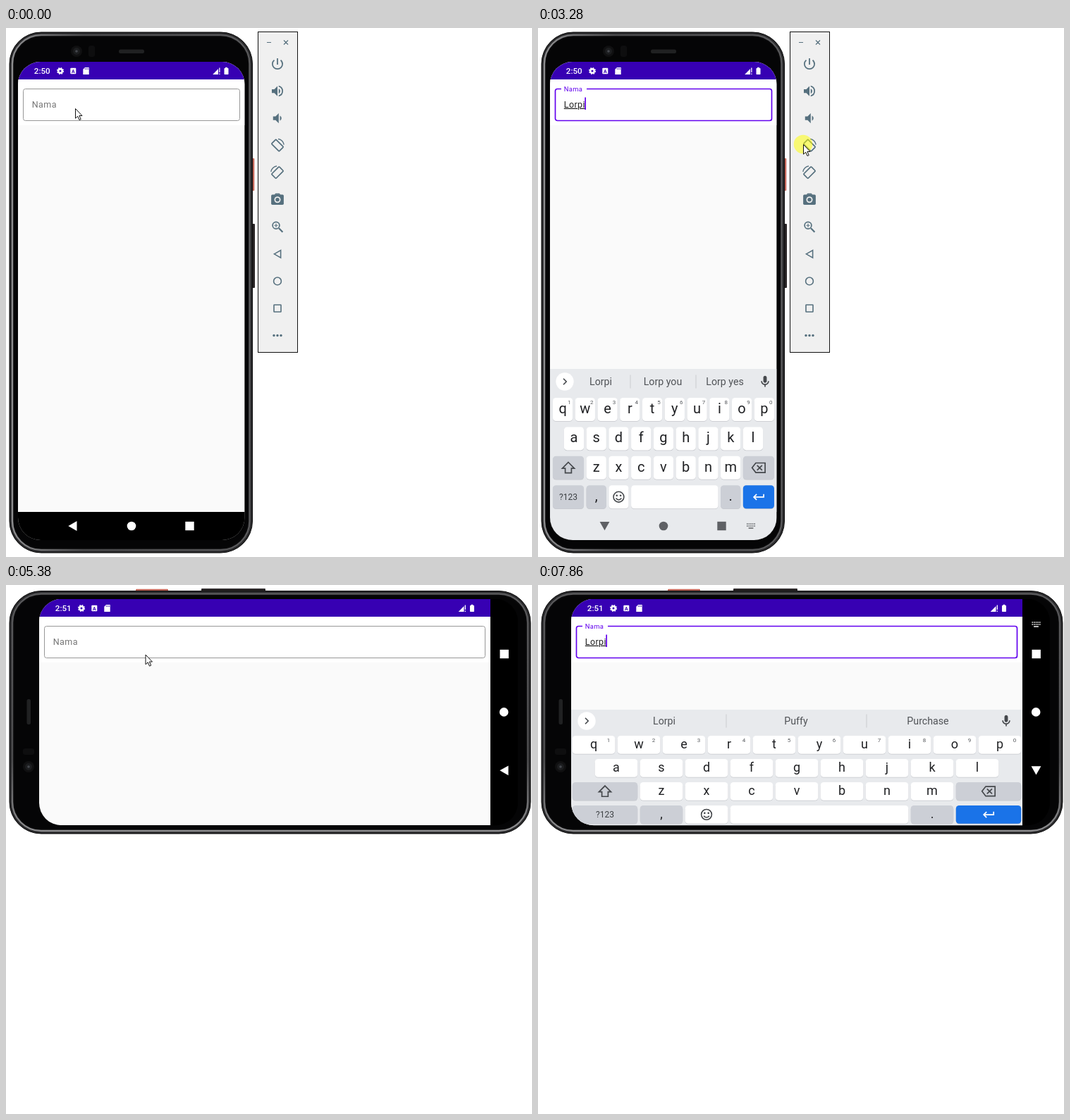
Animation, 746 px wide and 751 px high, one loop 8000 ms. Source, as an HTML page:

```html
<!DOCTYPE html>
<html lang="id">
<head>
<meta charset="utf-8">
<title>Form demo</title>
<style>
html, body { margin: 0; width: 100%; height: 100%; overflow: hidden; background: #fff; }
svg { display: block; width: 100vw; height: 100vh; }
text { font-family: Roboto, Arial, sans-serif; }
.mid { text-anchor: middle; }
.under { text-decoration: underline; text-decoration-thickness: 1px; }
</style>
</head>
<body>
<svg id="stage" viewBox="0 0 746 751"></svg>
<script>
const LOOP = 8000;
const WORD = 'Lorpi';
const PURPLE = '#6200ee';
const INK = '#3c4043';
const stage = document.getElementById('stage');

// ---------- drawing helpers ----------
const at = (x, y, s, more = '') => `<g transform="translate(${x} ${y})" ${more}>${s}</g>`;
const rect = (x, y, w, h, fill, r = 0, more = '') =>
  `<rect x="${x}" y="${y}" width="${w}" height="${h}" rx="${r}" fill="${fill}" ${more}/>`;
const disc = (x, y, r, fill = 'currentColor') => `<circle cx="${x}" cy="${y}" r="${r}" fill="${fill}"/>`;
const ring = (x, y, r, w) =>
  `<circle cx="${x}" cy="${y}" r="${r}" fill="none" stroke="currentColor" stroke-width="${w}"/>`;
const fill = (d, more = '') => `<path d="${d}" fill="currentColor" ${more}/>`;
const line = (d, w = 1.5, more = '') =>
  `<path d="${d}" fill="none" stroke="currentColor" stroke-width="${w}" ${more}/>`;
const text = (x, y, size, s, color = INK, more = '') =>
  `<text x="${x}" y="${y}" font-size="${size}" fill="${color}" ${more}>${s}</text>`;
const mid = (x, y, size, s, color = INK, more = '') => text(x, y, size, s, color, 'class="mid" ' + more);
const glyph = (d, k) => `<g transform="scale(${k}) translate(-12 -12)">${fill(d)}</g>`;

const gear = r => ring(0, 0, r * .55, r * .5) +
  `<circle r="${r * .85}" fill="none" stroke="currentColor" stroke-width="${r * .32}"
    stroke-dasharray="${r * .36} ${r * .3076}"/>`;

const icon = {
  mic: glyph('M12 14c1.66 0 3-1.34 3-3V5c0-1.66-1.34-3-3-3S9 3.34 9 5v6c0 1.66 1.34 3 3 3zm5-3c0 2.76-2.24 5-5 5s-5-2.24-5-5H5c0 3.53 2.61 6.43 6 6.92V21h2v-3.08c3.39-.49 6-3.39 6-6.92h-2z', .82),
  shift: line('M0-7.8L8.5 .8H4.4V7.4H-4.4V.8H-8.5Z', 1.7),
  erase: line('M-9.3 0L-4-6.8H9.2V6.8H-4ZM-2.2-3.5L5 3.5M5-3.5L-2.2 3.5', 1.7),
  enter: line('M7.2-4V.2H-6.6M-2.8-3.8L-6.8 .2L-2.8 4.2', 1.7),
  smile: ring(0, 0, 7.4, 1.6) + disc(-2.7, -2, 1.3) + disc(2.7, -2, 1.3) + line('M-4 1.8Q0 6.6 4 1.8', 1.5),
  sticker: line('M-6-6.2H6.2V2L2 6.2H-4.5Q-6.2 6.2-6.2 4.5V-4.5Q-6.2-6.2-4.5-6.2M2 6.2V2H6.2M-3 .8Q-1 3.5 1.5 2', 1.5) +
    disc(-2.3, -2, 1) + disc(2.3, -2, 1),
  clip: line('M-5.6-6H5.6V7H-5.6ZM-3-1.6H3M-3 1.2H3M-3 4H1', 1.5) + rect(-3, -8, 6, 3.6, 'currentColor', 1),
  palette: glyph('M12 3a9 9 0 0 0 0 18c.83 0 1.5-.67 1.5-1.5 0-.39-.15-.74-.39-1.01-.23-.26-.38-.61-.38-.99 0-.83.67-1.5 1.5-1.5H16c2.76 0 5-2.24 5-5 0-4.42-4.03-8-9-8z', .83) +
    [[-4.5, -.4], [-2, -3.8], [2.2, -3.8], [4.6, -.4]].map(p => disc(...p, 1.2, '#e8eaed')).join(''),
  dots: [-5, 0, 5].map(x => disc(x, 0, 1.7)).join(''),
  keys: line('M-6-3H6M-6 0H6', 1.6, 'stroke-dasharray="1.6 1"') + line('M-3.4 3H3.4', 1.6)
};

// ---------- emulator tool window ----------
function toolWindow() {
  const diamond = a => rect(-4.4, -7.6, 8.8, 15.2, 'none', 1,
    `stroke="currentColor" stroke-width="1.7" transform="rotate(${a})"`);
  const items = [
    glyph('M13 3h-2v10h2V3zm4.83 2.17l-1.42 1.42A6.92 6.92 0 0 1 19 12c0 3.87-3.13 7-7 7s-7-3.13-7-7c0-2.18 1-4.13 2.58-5.42L6.17 5.17A8.93 8.93 0 0 0 3 12a9 9 0 0 0 18 0c0-2.74-1.23-5.18-3.17-6.83z', .89),
    glyph('M3 9v6h4l5 5V4L7 9H3zm13.5 3A4.5 4.5 0 0 0 14 7.97v8.05A4.5 4.5 0 0 0 16.5 12zM14 3.23v2.06a7 7 0 0 1 0 13.42v2.06a9 9 0 0 0 0-17.54z', .89),
    glyph('M18.5 12A4.5 4.5 0 0 0 16 7.97v8.05A4.5 4.5 0 0 0 18.5 12zM5 9v6h4l5 5V4L9 9H5z', .89),
    diamond(-45) + line('M1-9.2A9.4 9.4 0 0 1 9.2-1', 1.4),
    diamond(45) + line('M-1-9.2A9.4 9.4 0 0 0-9.2-1', 1.4),
    rect(-8.9, -7.2, 17.8, 14.4, 'currentColor', 1.8) + fill('M-4.5-7L-2.7-9H2.7L4.5-7Z') +
      disc(0, 0, 4.5, '#f0f0f0') + disc(0, 0, 2.8),
    ring(-2, -2, 4.9, 1.7) + line('M2 2L7.4 7.4', 2.2) + line('M-4.6-2H.6M-2-4.6V.6', 1.1),
    line('M-4.6 0L4.6-5.3V5.3Z', 1.6),
    ring(0, 0, 5.4, 1.6),
    rect(-5, -5, 10, 10, 'none', .5, 'stroke="currentColor" stroke-width="1.6"'),
    icon.dots
  ];
  return rect(357.5, 5.5, 56, 455, '#f0f0f0', 0, 'stroke="#111"') +
    at(0, 0, line('M370 20.5H376M394 17.5L400 23.5M400 17.5L394 23.5', 1.2) +
      items.map((s, i) => at(385, 51 + i * 38.55, s)).join(''), 'color="#56707e"');
}

// ---------- phone body, upright ----------
const body =
  rect(346, 185, 6.3, 46, '#c4675a', 1) + rect(346, 278, 7, 91, '#2a2627', 1) +
  rect(5, 6, 344.5, 739, '#29292b', 45, 'stroke="#0a0a0a"') +
  rect(9, 10, 336.5, 731, '#09090a', 41, 'stroke="url(#rim)" stroke-width="2.4"') +
  rect(12, 13, 330.5, 725, '#050506', 38) +
  disc(100, 33, 8, '#101011') + disc(100, 33, 5, '#1c1d1f') + disc(100, 33, 1.8, '#45484d') +
  rect(117, 25, 9, 16, '#0e0e0f', 3) + rect(160, 30.5, 36, 5.5, '#202122', 2.5);

// ---------- keyboard ----------
function keyboard(o) {
  const key = (from, span, row, face, label, sup) => {
    const x = o.x0 + from * o.pitch + 1.75, w = span * o.pitch - 3.5;
    const y = o.top + o.row0 + row * o.rowGap, cx = x + w / 2, cy = y + o.kh / 2;
    return rect(x, y + .8, w, o.kh, '#c6c8cd', 4.5) + rect(x, y, w, o.kh, face, 4.5) +
      (label[0] === '<' ? at(cx, cy, label) : label === '?123'
        ? mid(cx, cy + 4, 12, label)
        : mid(cx, cy + 5.5, o.font, label, '#202124')) +
      (sup ? mid(cx + o.supX, y + 8.6, 8, sup, '#55585c') : '');
  };
  const white = '#fff', dim = '#cccfd6', none = '<g/>';
  let s = rect(0, o.top, o.W, o.H - o.top + 1, '#e8eaed');
  [...'qwertyuiop'].forEach((c, i) => s += key(i, 1, 0, white, c, String((i + 1) % 10)));
  [...'asdfghjkl'].forEach((c, i) => s += key(i + .5, 1, 1, white, c));
  [...'zxcvbnm'].forEach((c, i) => s += key(i + 1.5, 1, 2, white, c));
  s += key(0, 1.5, 2, dim, icon.shift) + key(8.5, 1.5, 2, dim, icon.erase) +
    key(0, 1.5, 3, dim, '?123') + key(1.5, 1, 3, dim, ',') + key(2.5, 1, 3, white, icon.smile) +
    key(3.5, 4, 3, white, none) + key(7.5, 1, 3, dim, '.') +
    key(8.5, 1.5, 3, '#1a73e8', `<g color="#fff">${icon.enter}</g>`);

  const bar = x => rect(x, -9.5, 1, 19, '#c9cbd0');
  const tools = [icon.sticker, mid(0, 4, 11.5, 'GIF', '#4a4d51', 'font-weight="700"'), icon.clip,
    gear(7), icon.palette, bar(0), icon.dots];
  s += at(0, o.top + o.strip,
    disc(o.round, 0, 12.7, '#fff') +
    at(o.round, 0, line('M-2-4.2L2.2 0L-2 4.2', 1.6), 'data-k="chevron"') +
    at(o.mic, 0, icon.mic) +
    `<g data-k="tools">${tools.map((t, i) => at(o.tools[i], 0, t)).join('')}</g>` +
    `<g data-k="words">${o.bars.map(bar).join('')}${o.words.map(x => mid(x, 5.3, 14.2, '', '#505357')).join('')}</g>`);
  return `<g data-k="board" color="#45484c">${s}</g>`;
}

// ---------- app screen ----------
function appScreen(o) {
  const { W, H } = o;
  const status = rect(0, 0, W, 25, '#3700b3') + at(0, 13,
    text(22.8, 4.2, 11.6, '', '#fff', 'font-weight="500" data-k="clock"') +
    at(60, 0, gear(5)) +
    at(78.3, 0, rect(-4, -4.3, 8, 8.6, '#fff', 1) + mid(0, 2.6, 7, 'A', '#3700b3', 'font-weight="700"')) +
    at(96.5, 0, fill('M-1.5-5H4.2V5H-4.2V-2.3Z') + line('M-1.2-4V-2M.8-4V-2M2.8-4V-2', .8, 'style="color:#3700b3"')) +
    at(W - 40, 0, fill('M-5.3 5L2.5-3V5ZM3.7-4.5H5V2H3.7ZM3.7 3.4H5V5H3.7Z')) +
    at(W - 26, 0, rect(-3, -4, 6, 9, '#fff', .8) + rect(-1.5, -5.2, 3, 1.5, '#fff')), 'color="#fff"');
  const field =
    rect(7.5, 38.5, Math.round(W - 15), 45, '#fff', 3, 'data-k="box"') +
    rect(16, 36, 0, 5, '#fff', 0, 'data-k="gap"') +
    text(19.8, 64.8, 12.5, 'Nama', '#757575', 'data-k="label"') +
    `<text x="19.8" y="64.8" font-size="12.5" letter-spacing=".39" fill="#212121" data-k="value"><tspan class="under"></tspan><tspan></tspan></text>` +
    rect(0, 50.5, 1.7, 17.5, PURPLE, 0, 'data-k="caret"');
  const n = o.nav;
  const nav = `<g data-k="nav">` +
    at(...n.back, fill('M-6.2 0L6-6.9V6.9Z', 'data-k="back"')) + disc(...n.home, 6.3) +
    at(...n.recent, rect(-6.2, -6.2, 12.4, 12.4, 'currentColor')) +
    at(...n.keys, icon.keys, 'data-k="keys"') + `</g>`;
  return rect(0, 0, o.fullW, o.fullH, '#000') +
    rect(0, 0, W, H, '#fafafa') + rect(0, 25, W, 65, '#fff') + status + field + keyboard(o.board) + nav;
}

const tall = {
  W: 321.5, H: 639, fullW: 321.5, fullH: 680, navInk: '#5f6165',
  nav: { back: [77.5, 659], home: [161, 659], recent: [243.5, 659], keys: [285, 659] },
  board: {
    W: 321.5, H: 679, top: 436, x0: 2.2, pitch: 31.75, row0: 41, rowGap: 41.4, kh: 33, font: 20, supX: 9.5,
    strip: 18, round: 21, mic: 305, bars: [113.5, 206.5], words: [72, 160, 248],
    tools: [60, 99, 138, 177, 217, 239, 261]
  }
};
const wide = {
  W: 640, H: 321, fullW: 680, fullH: 322, navInk: '#fff',
  nav: { back: [659.5, 243.3], home: [659.2, 160.4], recent: [659.7, 78], keys: [659.5, 36] },
  board: {
    W: 640, H: 321, top: 157, x0: 0, pitch: 64, row0: 37, rowGap: 33, kh: 25.7, font: 18, supX: 21,
    strip: 16, round: 22, mic: 617, bars: [219.5, 418.5], words: [132, 319, 506],
    tools: [106, 188, 272, 356, 440, 487, 534]
  }
};

stage.innerHTML = `
<defs>
  <linearGradient id="rim"><stop stop-color="#8d8d8f"/><stop offset=".3" stop-color="#4b4b4d"/><stop offset="1" stop-color="#59595b"/></linearGradient>
  <clipPath id="tallClip">${rect(17, 48, 321.5, 679, '#000', 32)}</clipPath>
  <clipPath id="wideClip">${rect(47, 19.8, 679, 321.5, '#000', 32)}</clipPath>
</defs>
<g id="tool">${toolWindow()}</g>
<g id="phone">${body}
  <g id="tallView" clip-path="url(#tallClip)">${rect(17, 48, 321.5, 679, '#d0d0d0')}
    <g id="tallSpin">${at(17, 48, appScreen(tall), 'id="tall"')}</g></g></g>
<g clip-path="url(#wideClip)"><g id="wideSpin">${at(47, 20, appScreen(wide), 'id="wide"')}</g></g>
<circle id="press" r="13.3" fill="#ff0" opacity=".52"/>
<path id="mouse" d="M.5 .5V14.2L3.7 11.3L6 16.6L8.2 15.6L5.9 10.5H10Z" fill="#fff" stroke="#111" stroke-width="1"/>`;

const $ = id => document.getElementById(id);
const parts = id => {
  const p = {};
  $(id).querySelectorAll('[data-k]').forEach(e => p[e.dataset.k] = e);
  return p;
};
const views = [[parts('tall'), tall], [parts('wide'), wide]];

// ---------- timing ----------
const ticks = [0];
[[550, 1340, 8], [1460, 1460, 1], [1680, 2250, 6], [2490, 3280, 8], [3380, 3490, 2], [3720, 3720, 1],
 [4500, 4830, 4], [5170, 5380, 3], [5490, 5950, 5], [6060, 6180, 2], [6400, 6860, 5], [7080, 7080, 1],
 [7410, 7410, 1], [7650, 7650, 1], [7860, 7860, 1]].forEach(([a, b, n]) => {
  for (let i = 0; i < n; i++) ticks.push(n > 1 ? Math.floor(a + (b - a) * i / (n - 1)) : a);
});
const snap = t => ticks.filter(k => k <= t).pop();
const ramp = (t, a, b) => Math.min(1, Math.max(0, (t - a) / (b - a)));
const smooth = u => u * u * (3 - 2 * u);
const ease = (t, a, b) => smooth(ramp(t, a, b));
const mix = (a, b, u) => a + (b - a) * u;
const count = (t, list) => list.filter(k => k <= t).length;
const within = (t, a, b) => t >= a && t < b;
const show = (e, on) => e.setAttribute('visibility', on ? 'inherit' : 'hidden');

const stem = WORD.slice(0, 4);
const hints = [['L', 'Lol', 'Like'], [stem.slice(0, 3), 'Look', 'Lot'], [stem, stem + ' you', stem + ' yes'],
  [WORD, stem + ' you', stem + ' yes'], [WORD, 'Puffy', 'Purchase']];

function drawView([p, o], s) {
  const f = s.float, on = f > 0;
  p.clock.textContent = s.clock;
  p.box.setAttribute('stroke', on ? PURPLE : '#8c8c8c');
  p.box.setAttribute('stroke-width', on ? 1.7 : .9);
  p.gap.setAttribute('width', 36 * f);
  p.label.setAttribute('y', mix(64.8, 42, f));
  p.label.setAttribute('font-size', mix(12.5, 9.4, f));
  p.label.setAttribute('letter-spacing', mix(.39, .31, f));
  p.label.setAttribute('fill', on ? PURPLE : '#757575');

  const [lined, plain] = p.value.children;
  lined.textContent = s.text.slice(0, s.lined);
  plain.textContent = s.text.slice(s.lined);
  const w = s.text ? p.value.getComputedTextLength() : 0;
  p.caret.setAttribute('x', 19.2 + w);
  show(p.caret, s.caret);

  const b = o.board;
  p.board.setAttribute('transform', `translate(0 ${(1 - s.up) * (b.H - b.top + 2)})`);
  show(p.board, s.up > 0);
  const hint = hints[s.hint];
  show(p.tools, !hint);
  show(p.words, hint);
  p.chevron.setAttribute('transform', `translate(${b.round} 0) scale(${hint ? 1 : -1} 1)`);
  if (hint) p.words.querySelectorAll('text').forEach((e, i) => e.textContent = hint[i]);

  p.nav.setAttribute('color', s.up > 0 ? o.navInk : '#fff');
  p.back.setAttribute('transform', `rotate(${-90 * s.turn})`);
  show(p.keys, s.up > 0);
}

function draw(time) {
  const t = snap(time);
  const flat = t >= 3380;
  const u = ramp(t, 4360, 4820), spin = t < 4500 ? 0 : 90 * smooth(u);
  const clock = t < 3720 ? '2:50' : '2:51';

  show($('tool'), !flat);
  show($('tallView'), u < 1);
  $('phone').setAttribute('transform', flat ? 'matrix(0 -1 1 0 -1 358)' : '');
  $('tallSpin').setAttribute('transform', `rotate(${spin} 177.75 387.5)`);
  $('wideSpin').setAttribute('transform', `rotate(${spin - 90} 386.5 180.5)`);
  $('wideSpin').setAttribute('opacity', t < 4500 ? 0 : ramp(u, .28, .9));

  const n1 = count(t, [1340, 1460, 1680, 1900, 2130]);
  drawView(views[0], {
    clock, float: ease(t, 600, 770), up: ease(t, 690, 1000), turn: ease(t, 700, 1100),
    text: WORD.slice(0, n1), lined: n1 === 2 ? 1 : n1,
    hint: count(t, [1460, 1790, 2020, 2240]) - 1,
    caret: within(t, 770, 2710) || within(t, 3270, 3380)
  });

  const n2 = count(t, [6400, 6510, 6620, 6740, 7080]);
  drawView(views[1], {
    clock, float: ease(t, 5530, 5700), up: ease(t, 5620, 5900), turn: ease(t, 5660, 6050),
    text: WORD.slice(0, n2), lined: n2,
    hint: [-1, 0, 0, 1, 2, 4][n2],
    caret: within(t, 5700, 6180) || within(t, 6400, 7410) || t >= 7860
  });

  const a = ease(t, 2400, 3160), b = ramp(t, 5060, 5380);
  let x = mix(mix(98, 376, a), 197.5, b), y = mix(mix(114, 165, a), 98.5, b);
  if (t >= 7410) { x = 253; y = 123; }
  $('mouse').setAttribute('transform', `translate(${x} ${y})`);
  show($('mouse'), t < 6740 || within(t, 7410, 7650));
  $('press').setAttribute('cx', x);
  $('press').setAttribute('cy', y);
  show($('press'), within(t, 550, 770) || within(t, 3270, 3490) || within(t, 5490, 5700));
}

const start = performance.now();
function frame(now) {
  draw(Math.max(0, now - start) % LOOP);
  requestAnimationFrame(frame);
}
draw(0);
requestAnimationFrame(frame);
</script>
</body>
</html>
```
